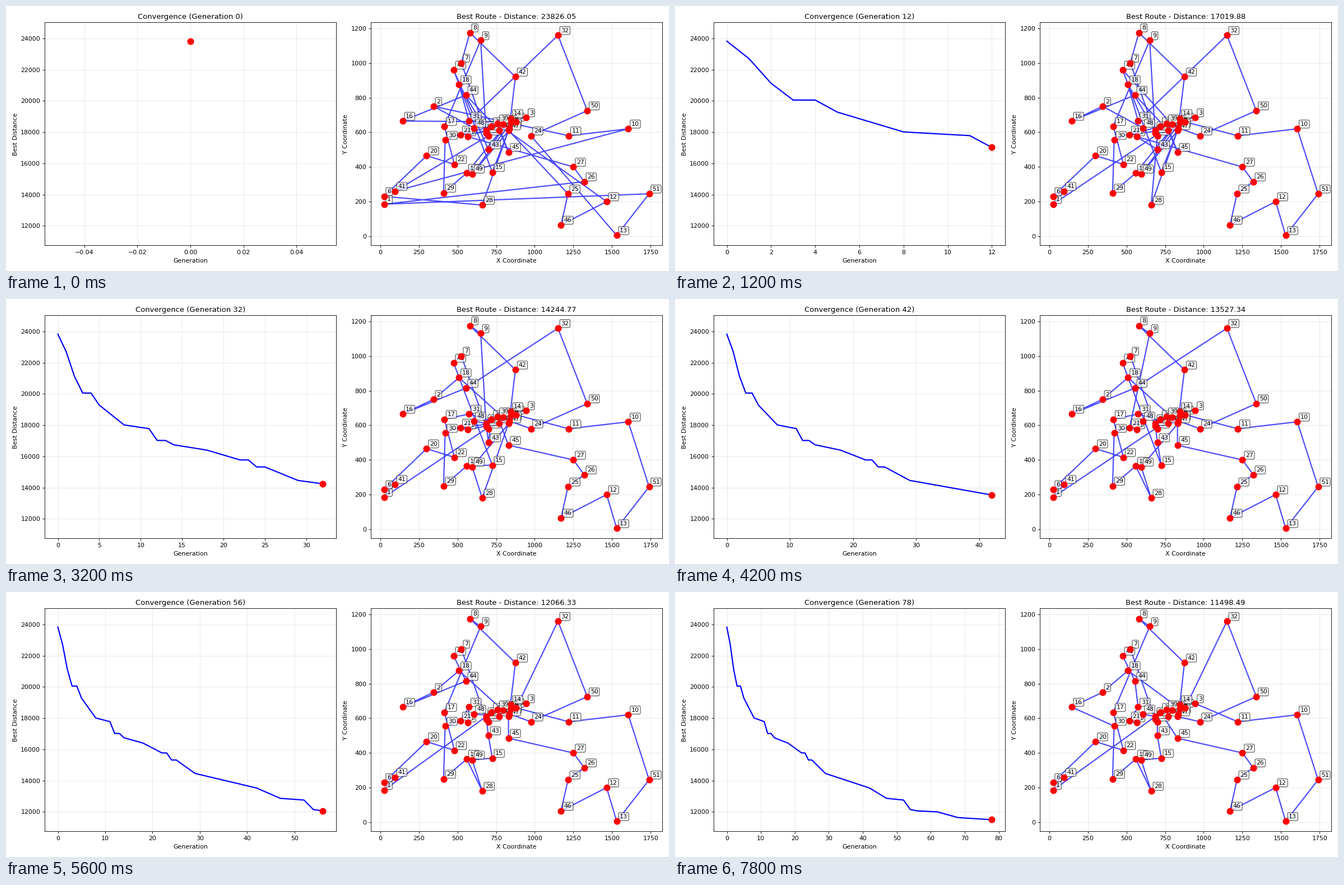
Write a matplotlib script that moves like this. It is 1183 by 473 pixels and loops after 8000 ms.

```python
import random

import matplotlib.pyplot as plt
import numpy as np
from matplotlib.animation import FuncAnimation

WIDTH, HEIGHT, DPI = 1183, 473, 78.867
STEP = 2          # generations per picture
PICTURES = 40
INTERVAL = 200
TRIALS = 250      # reversals tried per picture

CITIES = np.array([
    (565, 575), (25, 185), (345, 750), (945, 685), (845, 655), (880, 660),
    (25, 230), (525, 1000), (580, 1175), (650, 1130), (1605, 620),
    (1220, 580), (1465, 200), (1530, 5), (845, 680), (725, 370), (145, 665),
    (415, 635), (510, 875), (560, 365), (300, 465), (520, 585), (480, 415),
    (835, 625), (975, 580), (1215, 245), (1320, 315), (1250, 400),
    (660, 180), (410, 250), (420, 555), (575, 665), (1150, 1160),
    (700, 580), (685, 595), (685, 610), (770, 610), (795, 645), (720, 635),
    (760, 650), (475, 960), (95, 260), (875, 920), (700, 500), (555, 815),
    (830, 485), (1170, 65), (830, 610), (605, 625), (595, 360),
    (1340, 725), (1740, 245),
])

LAST_TOUR = [
    3, 11, 10, 51, 13, 12, 46, 25, 26, 27, 45, 38, 39, 36, 37, 5, 32, 50,
    24, 47, 23, 4, 18, 2, 16, 30, 29, 19, 28, 49, 15, 43, 33, 34, 7, 40,
    44, 31, 21, 0, 48, 35, 1, 41, 6, 20, 22, 17, 9, 8, 42, 14,
]

# (generation, best distance) where the slope changes
KNOTS = [
    (0, 23826.05), (1, 22709), (2, 21130), (3, 20055), (4, 20055),
    (5, 19283), (8, 18014), (11, 17777), (12, 17019.88), (13, 17019.88),
    (14, 16741), (18, 16402), (22, 15773), (23, 15773), (24, 15323.52),
    (25, 15323.52), (29, 14460), (42, 13527.34), (47, 12868), (52, 12758),
    (54, 12148), (56, 12066.33), (62, 11999), (68, 11637.09), (78, 11498.49),
]
GENS = np.arange(PICTURES * STEP - 1)
BEST = np.interp(GENS, *zip(*KNOTS))


def closed(tour):
    return CITIES[tour + tour[:1]]


def length(tour):
    return np.hypot(*np.diff(closed(tour), axis=0).T).sum()


def reverse_part(tour, rng):
    a, b = sorted(rng.sample(range(len(tour) + 1), 2))
    return tour[:a] + tour[a:b][::-1] + tour[b:]


def build_tours():
    """Walk back from the last tour, worsening it to each best distance."""
    rng = random.Random(52)
    tours = [LAST_TOUR]
    for goal in BEST[::STEP][-2::-1]:
        trials = [reverse_part(tours[-1], rng) for _ in range(TRIALS)]
        tours.append(min(trials, key=lambda t: abs(length(t) - goal)))
    return tours[::-1]


TOURS = build_tours()

fig, (left, right) = plt.subplots(
    1, 2, figsize=((WIDTH + 0.01) / DPI, (HEIGHT + 0.01) / DPI), dpi=DPI)

curve, = left.plot([], [], "b-", linewidth=2)
tip, = left.plot([], [], "ro", markersize=10)
left.set_ylim(10744, BEST[0] * 1.05)
left.set_xlabel("Generation")
left.set_ylabel("Best Distance")

path, = right.plot([], [], "b-", linewidth=2, alpha=0.7)
right.scatter(*CITIES.T, c="red", s=100, zorder=5)
for i, spot in enumerate(CITIES):
    note = right.annotate(
        str(i), spot, xytext=(5, 5), textcoords="offset points", fontsize=10,
        bbox=dict(boxstyle="round,pad=0.2", facecolor="white", alpha=0.7))
    note.set_in_layout(False)
right.set_xlim(-60.75, 1825.75)
right.set_ylim(-53.5, 1233.5)
right.set_xlabel("X Coordinate")
right.set_ylabel("Y Coordinate")

for ax in (left, right):
    ax.grid(True, alpha=0.3)


def update(k):
    gen = k * STEP
    curve.set_data(GENS[:gen + 1], BEST[:gen + 1])
    tip.set_data([gen], [BEST[gen]])
    pad = 0.05 * gen or 0.055
    left.set_xlim(-pad, gen + pad)
    left.set_title(f"Convergence (Generation {gen})")

    path.set_data(*closed(TOURS[k]).T)
    right.set_title(f"Best Route - Distance: {BEST[gen]:.2f}")
    fig.tight_layout()
    fig.subplots_adjust(top=1 - 29.5 / HEIGHT, bottom=1 - 427.5 / HEIGHT)
    return curve, tip, path


anim = FuncAnimation(fig, update, frames=PICTURES, interval=INTERVAL,
                     repeat=True, repeat_delay=0, blit=False)
plt.show()
```
